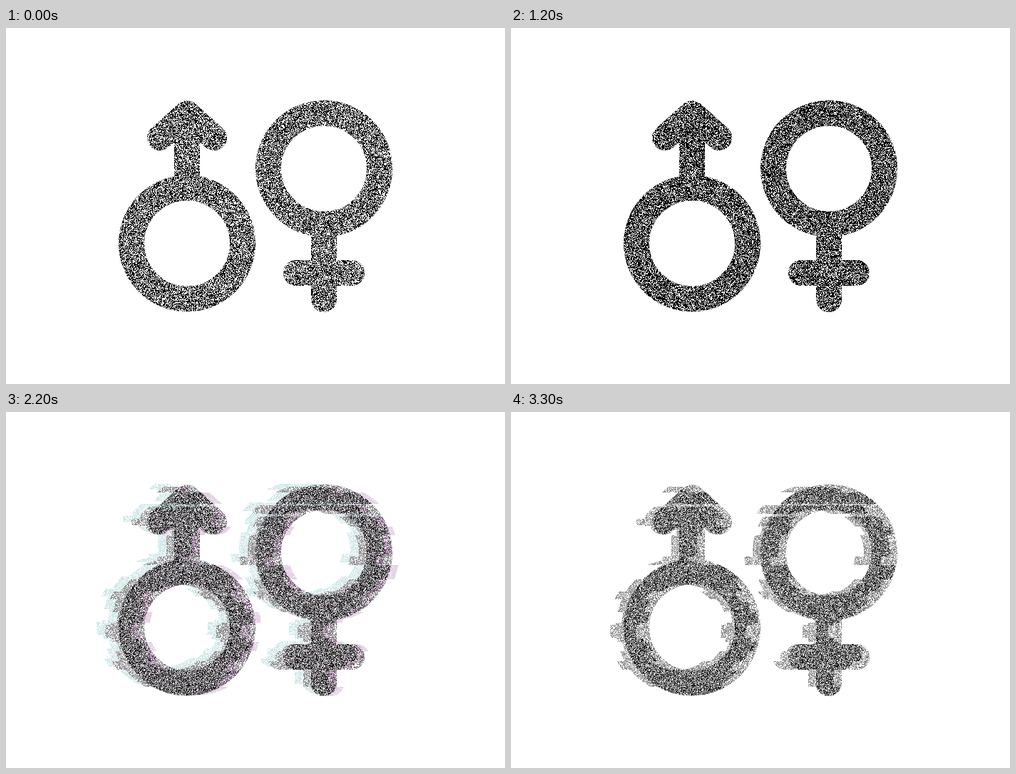
These frames come from a looping animation (700x500 px, 3400 ms). An HTML page with a canvas:

```html
<!DOCTYPE html>
<html lang="en">
<head>
<meta charset="utf-8">
<title>Glitching symbols</title>
<style>
  html, body { margin: 0; width: 100%; height: 100%; overflow: hidden; background: #fff; }
  canvas { display: block; }
</style>
</head>
<body>
<canvas id="stage" width="700" height="500"></canvas>
<script>
const W = 700, H = 500, STEP = 100, SPLIT = 350;
const stage = document.getElementById('stage').getContext('2d');

function makeLayer() {
  const canvas = document.createElement('canvas');
  canvas.width = W;
  canvas.height = H;
  return canvas.getContext('2d');
}

function random(seed) {
  return () => {
    seed = (seed + 0x6D2B79F5) | 0;
    let t = Math.imul(seed ^ (seed >>> 15), 1 | seed);
    t ^= t + Math.imul(t ^ (t >>> 7), 61 | t);
    return ((t ^ (t >>> 14)) >>> 0) / 4294967296;
  };
}

function drawSymbols() {
  const c = makeLayer();
  c.lineWidth = 36;
  c.lineCap = c.lineJoin = 'round';
  c.stroke(new Path2D(
    'M216 154L254 120L292 154M254 120V215' +
    'M446 285V381M407 344H485'));
  for (const [x, y] of [[254, 302.5], [446, 197.5]]) {
    c.beginPath();
    c.arc(x, y, 78, 0, 2 * Math.PI);
    c.stroke();
  }
  // A bare ring keeps the stems from showing inside it.
  c.globalCompositeOperation = 'destination-out';
  for (const [x, y] of [[254, 302.5], [446, 197.5]]) {
    c.beginPath();
    c.arc(x, y, 59.5, 0, 2 * Math.PI);
    c.fill();
  }
  return c.canvas;
}

// Each slice is [top, shift]; a null shift leaves a gap.
const lower = [
  [161, 7], [173, 0], [203, -12], [215, 10], [235, 0], [252, -10],
  [263, 0], [281, 8], [296, 0], [299, -8], [317, 0], [323, 7],
  [336, 0], [350, -11], [362, 0], [386, 10], [400, null]
];
const maleSlices = [
  [105, -12], [113, 12], [129, null], [133, 0], [150, -11], [159, 0], ...lower
];
const femaleSlices = [
  [105, -12], [113, 10], [129, null], [131, -12], [143, null], [147, 0], ...lower
];

function sliceSymbols(symbols, dx, dy) {
  const c = makeLayer();
  [maleSlices, femaleSlices].forEach((slices, side) => {
    const x = side * SPLIT;
    for (let i = 0; i < slices.length - 1; i++) {
      const [y, shift] = slices[i];
      if (shift === null) continue;
      const h = slices[i + 1][0] - y;
      c.drawImage(symbols, x, y, SPLIT, h, x + shift + dx, y + dy, SPLIT, h);
    }
  });
  return c.canvas;
}

// The palette lists [share, r, g, b, alpha]; shares add up to one.
function grain(shape, seed, palette) {
  const c = makeLayer(), image = c.createImageData(W, H), next = random(seed);
  for (let i = 0; i < image.data.length; i += 4) {
    let pick = next(), k = 0;
    while (k < palette.length - 1 && pick >= palette[k][0]) pick -= palette[k++][0];
    image.data.set(palette[k].slice(1), i);
  }
  c.putImageData(image, 0, 0);
  c.globalCompositeOperation = 'destination-in';
  c.drawImage(shape, 0, 0);
  return c.canvas;
}

function onWhite(layer) {
  const c = makeLayer();
  c.fillStyle = '#fff';
  c.fillRect(0, 0, W, H);
  c.drawImage(layer, 0, 0);
  return c.canvas;
}

const ink = (share, alpha) => [[share, 0, 0, 0, alpha], [1 - share, 255, 255, 255, alpha]];
const pink = [[.45, 224, 160, 224, 255], [.4, 178, 172, 178, 255], [.15, 245, 230, 245, 255]];
const cyan = [[.4, 152, 220, 220, 255], [.25, 182, 186, 186, 255], [.35, 245, 255, 255, 255]];

const symbols = drawSymbols();
const layers = {
  C: grain(symbols, 1, ink(.55, 255)),
  D: grain(symbols, 2, ink(.65, 255)),
  G: grain(sliceSymbols(symbols, -11, 0), 3, ink(.63, 215)),
  M: grain(sliceSymbols(symbols, 0, 0), 4, pink),
  Y: grain(sliceSymbols(symbols, -23, -4), 5, cyan),
  R: grain(sliceSymbols(symbols, 8, -4), 6, cyan)
};
layers.c = onWhite(layers.C);
layers.d = onWhite(layers.D);

// One entry per step, layers from back to front; lower case is a half blend.
const steps = (
  'C C Gc G MG MGc MC Gc YG YGc G Gc D D Gd MG YMGd MG RYMG Gd ' +
  'C C YMGc YMG MG MGc MC MC MGc MG G MG MGc Gc').split(' ');

function draw(now) {
  const step = steps[Math.floor(now / STEP) % steps.length];
  stage.globalAlpha = 1;
  stage.fillStyle = '#fff';
  stage.fillRect(0, 0, W, H);
  for (const name of step) {
    stage.globalAlpha = name === name.toLowerCase() ? .5 : 1;
    stage.drawImage(layers[name], 0, 0);
  }
}

const start = performance.now();
function tick() {
  draw(performance.now() - start);
  requestAnimationFrame(tick);
}
tick();
</script>
</body>
</html>
```
